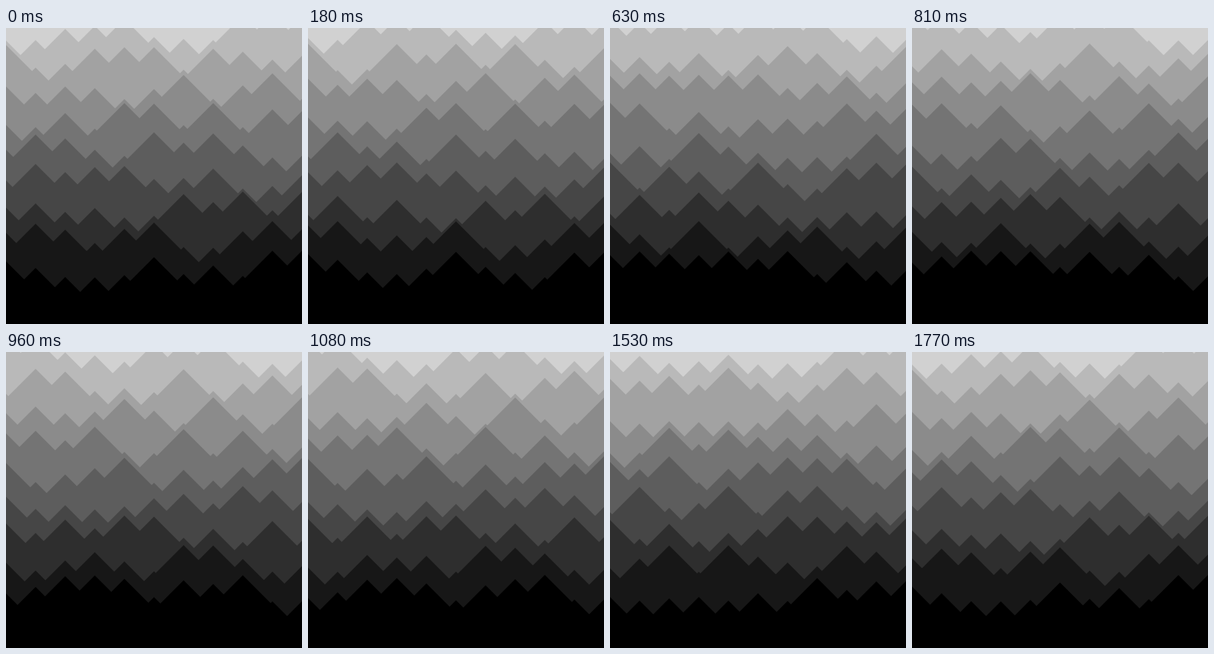
Animation of 400x400 px, one loop 1800 ms. Source, as an HTML page with a canvas:

```html
<!DOCTYPE html>
<html>
<head>
<meta charset="utf-8">
<title>Ridges</title>
<style>
  html, body { margin: 0; width: 100%; height: 100%; overflow: hidden; background: #000; }
  canvas { display: block; width: 400px; height: 400px; }
</style>
</head>
<body>
<canvas id="stage" width="400" height="400"></canvas>
<script>
const ctx = document.getElementById('stage').getContext('2d');
const SIZE = 400, LOOP = 1800, STEP = 30;
const GAP = 40, SWING = 18, TOP = -1;

// Angle, in degrees, at which each peak stands highest; rows run top to bottom.
const PHASES = [
  [180, 196, 97, 84, 51, 137, 151, 164, 333, 353, 325],
  [27, 217, 238, 52, 316, 44, 163, 52, 293, 258, 85],
  [90, 119, 90, 97, 161, 101, 30, 201, 85, 8, 202],
  [132, 146, 283, 198, 345, 22, 227, 14, 146, 60, 68],
  [252, 34, 303, 108, 220, 3, 283, 337, 271, 153, 221],
  [113, 328, 76, 52, 314, 106, 258, 300, 184, 144, 90],
  [258, 84, 238, 104, 198, 215, 324, 282, 2, 246, 345],
  [83, 37, 291, 130, 295, 28, 198, 180, 284, 5, 67],
  [78, 107, 165, 174, 146, 59, 138, 264, 208, 6, 5]
];

function gray(level) {
  const v = Math.round(255 * level / 11);
  return `rgb(${v},${v},${v})`;
}

function drawRidge(row, angle) {
  ctx.fillStyle = gray(PHASES.length - 1 - row);
  ctx.beginPath();
  PHASES[row].forEach((phase, col) => {
    const x = col * GAP;
    const y = TOP + row * GAP - SWING * Math.cos(angle - phase * Math.PI / 180);
    const reach = SIZE + GAP - y;
    ctx.moveTo(x, y);
    ctx.lineTo(x + reach, y + reach);
    ctx.lineTo(x - reach, y + reach);
    ctx.closePath();
  });
  ctx.fill();
}

function draw(ms) {
  const t = Math.floor((ms % LOOP) / STEP) * STEP;
  const angle = t / LOOP * 2 * Math.PI;
  ctx.fillStyle = gray(PHASES.length);
  ctx.fillRect(0, 0, SIZE, SIZE);
  for (let row = 0; row < PHASES.length; row++) drawRidge(row, angle);
}

const start = performance.now();
function tick() {
  draw(performance.now() - start);
  requestAnimationFrame(tick);
}
tick();
</script>
</body>
</html>
```
